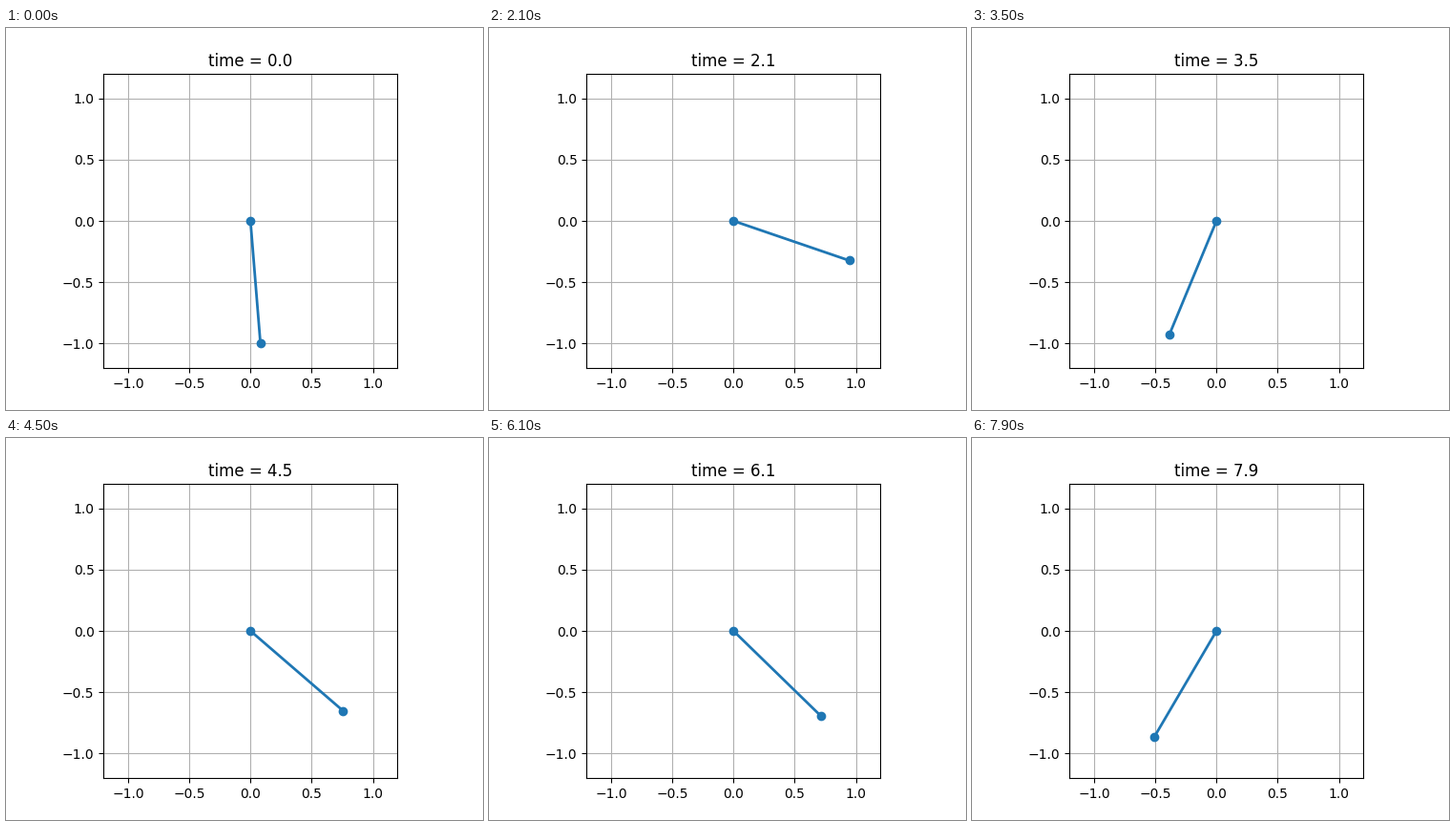
Recreate the animation shown at these times as a matplotlib script. Size 500x400 px, loop 8000 ms.

```python
import numpy as np
import matplotlib.pyplot as plt
from matplotlib.animation import FuncAnimation

FRAMES = 80
DT = 0.1
SUBSTEPS = 5


def deriv(theta, omega, g, b):
    return omega, -g * np.sin(theta) - b * omega


def swing(theta, omega, g, b):
    """Angles of a damped unit pendulum at every frame (RK4)."""
    h = DT / SUBSTEPS
    path = [theta]
    for _ in range(FRAMES - 1):
        for _ in range(SUBSTEPS):
            a1, w1 = deriv(theta, omega, g, b)
            a2, w2 = deriv(theta + h / 2 * a1, omega + h / 2 * w1, g, b)
            a3, w3 = deriv(theta + h / 2 * a2, omega + h / 2 * w2, g, b)
            a4, w4 = deriv(theta + h * a3, omega + h * w3, g, b)
            theta = theta + h / 6 * (a1 + 2 * a2 + 2 * a3 + a4)
            omega = omega + h / 6 * (w1 + 2 * w2 + 2 * w3 + w4)
        path.append(theta)
    return np.array(path)


def fit(times, angles, guess, rounds=25, relax=0.7):
    """Gauss-Newton fit of (theta, omega, g, b) to timed angles."""
    p = np.array(guess, float)
    idx = np.rint(np.array(times) / DT).astype(int)
    eps = 1e-5
    shifts = np.hstack([np.zeros((4, 1)), eps * np.eye(4)])
    for _ in range(rounds):
        runs = swing(*(p[:, None] + shifts))[idx]
        jac = (runs[:, 1:] - runs[:, :1]) / eps
        p += relax * np.linalg.lstsq(jac, angles - runs[:, 0], rcond=None)[0]
    return p


# measured swing: time (s) -> angle from straight down (rad)
POSES = {
    0.0: 0.080, 0.9: -1.334, 1.1: -0.634, 2.1: 1.247, 2.7: -1.011,
    3.5: -0.390, 3.6: 0.0175, 4.5: 0.863, 6.1: 0.803, 6.3: 1.187,
    6.4: 1.231, 7.2: -0.732, 7.9: -0.528,
}
params = fit(list(POSES), np.array(list(POSES.values())), (0.08, -4.9, 9.8, 0.1))
theta = swing(*params)

fig, ax = plt.subplots(figsize=(5, 4), dpi=100)
ax.set_aspect("equal")
ax.set_xlim(-1.2, 1.2)
ax.set_ylim(-1.2, 1.2)
ax.set_xticks(np.arange(-1, 1.1, 0.5))
ax.set_yticks(np.arange(-1, 1.1, 0.5))
ax.grid()
rod, = ax.plot([], [], "o-", lw=2)
title = ax.set_title("")


def update(i):
    rod.set_data([0, np.sin(theta[i])], [0, -np.cos(theta[i])])
    title.set_text(f"time = {i * DT:.1f}")
    return rod, title


anim = FuncAnimation(fig, update, frames=FRAMES, interval=100, repeat=True,
                     repeat_delay=0)
plt.show()
```
